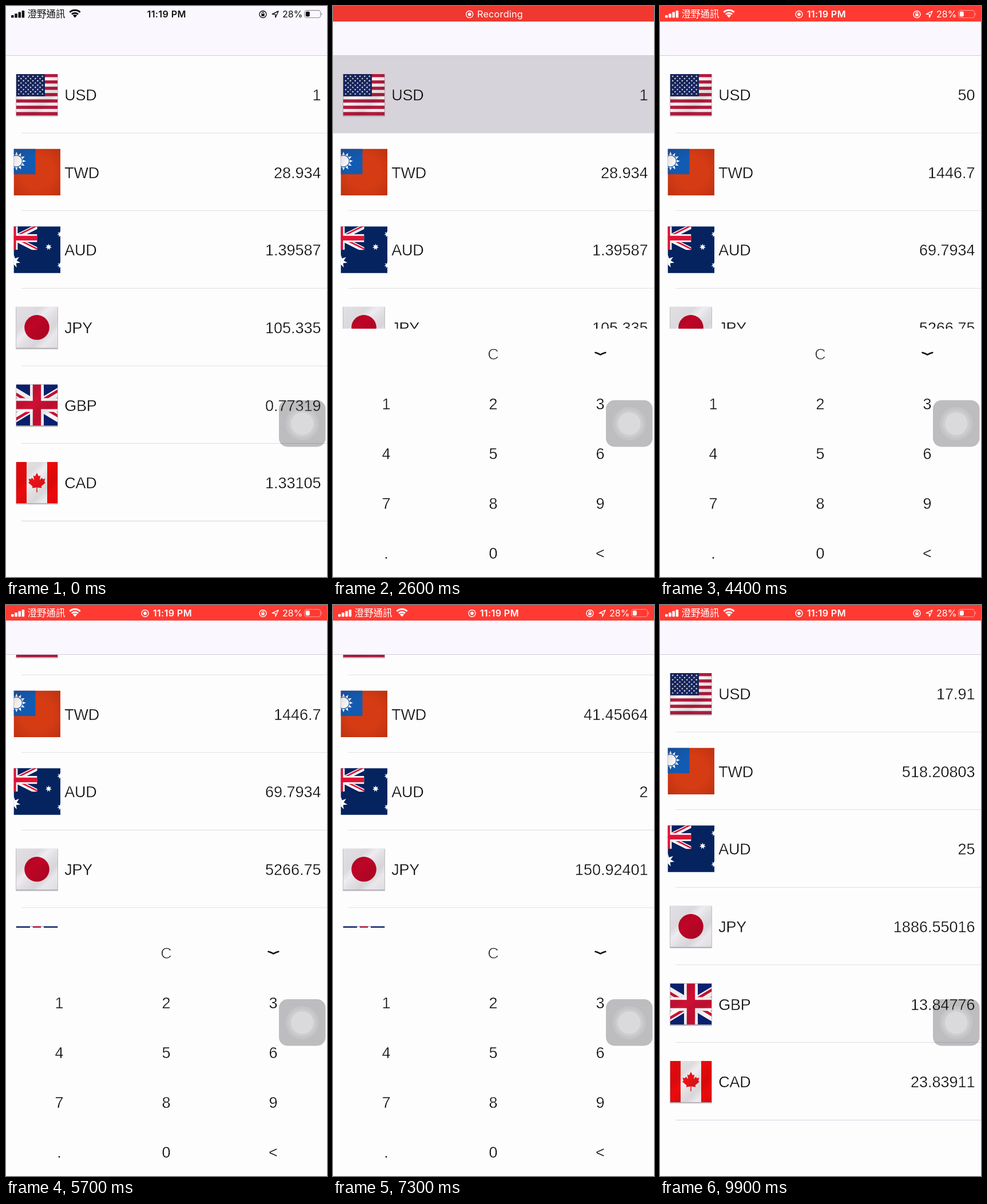
Recreate the animation shown at these times as an HTML page. Size 561 by 998 pixels, loop 10000 ms.

```html
<!DOCTYPE html>
<html lang="en">
<head>
<meta charset="utf-8">
<title>Currency converter</title>
<style>
  html, body { margin: 0; width: 100%; height: 100%; overflow: hidden; background: #fdfdfe; }
  svg { display: block; width: 561px; height: 998px; }
  text { font-family: "Liberation Sans", Arial, sans-serif; }
  .thin { --bg: #fdfdfe; font-size: 27px; font-kerning: none; fill: #080808; stroke: var(--bg); stroke-width: .45px; }
  .code { letter-spacing: -.3px; }
  .clear { fill: #222; stroke-width: .9px; }
  .bar text { font-family: Inter, "Noto Sans", sans-serif; fill: currentColor; }
  .bar .carrier { font-family: "Noto Sans CJK TC", "Noto Sans CJK", sans-serif; }
</style>
</head>
<body>
<svg id="stage" viewBox="0 0 561 998" xmlns="http://www.w3.org/2000/svg"></svg>
<script>
const LOOP = 10000, TOP = 87, PITCH = 135.6, PAPER = '#fdfdfe', PICKED = '#d6d3da';
const RATES = { USD: 1, TWD: 28.934, AUD: 1.395868, JPY: 105.335, GBP: .773186, CAD: 1.33105 };
const CODES = Object.keys(RATES);

// Each step holds until the next one.
const AMOUNTS = [[0, 'USD', 1], [3300, 'USD', 5], [3800, 'USD', 50], [7100, 'AUD', 2], [7500, 'AUD', 25]];
const PICKS = [[0, null], [2300, 'USD'], [3300, null], [6000, 'AUD'], [7100, null]];
const BARS = [[0, 'plain'], [900, 'notice'], [3500, 'live']];
const KEYPAD = [[0, false], [2300, true], [9100, false]];
const SCROLL = [[0, 0], [4900, 0], [5500, 100], [9100, 100], [9400, 0]];

const rect = (x, y, w, h, fill, more = '') =>
  `<rect x="${x}" y="${y}" width="${w}" height="${h}" fill="${fill}" ${more}/>`;
const circle = (x, y, r, fill, more = '') => `<circle cx="${x}" cy="${y}" r="${r}" fill="${fill}" ${more}/>`;
const path = (d, fill, more = '') => `<path d="${d}" fill="${fill}" ${more}/>`;
const repeat = (n, make) => Array.from({ length: n }, (_, i) => make(i)).join('');

function star(x, y, r, points, inner, fill = '#fff') {
  const at = i => {
    const a = Math.PI * i / points - Math.PI / 2, d = i % 2 ? r * inner : r;
    return (x + d * Math.cos(a)).toFixed(2) + ' ' + (y + d * Math.sin(a)).toFixed(2);
  };
  return path('M' + Array.from({ length: points * 2 }, (_, i) => at(i)).join('L') + 'Z', fill);
}

// Union flag of w by h, centred on the origin.
function union(w, h, blue, red) {
  const X = w / 2, Y = h / 2, k = h / 30 / Math.hypot(X, Y);
  const arms = [[1, -1], [1, 1], [-1, 1], [-1, -1]]
    .map(([a, b]) => `M${b * Y * k} ${-a * X * k}l${a * X} ${b * Y}`).join('');
  return rect(-X, -Y, w, h, blue) +
    path(`M${-X} ${-Y}L${X} ${Y}M${-X} ${Y}L${X} ${-Y}`, 'none', `stroke="#fff" stroke-width="${h / 5}"`) +
    path(arms, 'none', `stroke="${red}" stroke-width="${h / 15}"`) +
    rect(-X, -h / 6, w, h / 3, '#fff') + rect(-h / 6, -Y, h / 3, h, '#fff') +
    rect(-X, -h / 10, w, h / 5, red) + rect(-h / 10, -Y, h / 5, h, red);
}

function leaf() {
  const half = [[0, -17], [3.2, -11], [6.2, -12.6], [5, -4.5], [9, -8.8], [10, -6], [14.5, -6.8],
    [13, -1.5], [15, .2], [7.5, 6.5], [8.5, 9.5], [.7, 8.5], [.8, 17]];
  const back = half.slice(1).reverse().map(([x, y]) => [-x, y]);
  return path('M' + [...half, ...back].join('L') + 'Z', '#e8141a', 'transform="translate(36 36)"');
}

const FLAGS = {
  USD: () => repeat(13, i => rect(0, i * 72 / 13, 72, 72 / 13, i % 2 ? '#f6f2f4' : '#b8193d')) +
    rect(0, 0, 50, 38.8, '#172660') +
    repeat(9, r => repeat(6 - r % 2, c => star(4.2 + c * 8.3 + r % 2 * 4.15, 4 + r * 3.85, 1.9, 5, .42))),
  TWD: () => rect(0, 0, 82, 82, '#d63c14') + rect(0, 0, 38, 44.5, '#125bb0') +
    star(4.8, 21.5, 16.5, 12, .62) + circle(4.8, 21.5, 10.7, '#125bb0') + circle(4.8, 21.5, 9.5, '#fff') +
    rect(0, 0, 82, 82, 'url(#vignette)'),
  AUD: () => rect(0, 0, 82, 82, '#04235f') +
    `<g clip-path="url(#canton)"><g transform="translate(0 20.5)">${union(82, 41, '#04235f', '#e01234')}</g></g>` +
    star(0, 61, 12, 7, .45) + star(61, 36, 5.8, 7, .45) + star(81.5, 13.6, 5.8, 7, .45) + star(81.5, 68, 5.8, 7, .45),
  JPY: () => rect(0, 0, 72, 72, '#eeecf0') + circle(36, 36, 21.8, '#c00527'),
  GBP: () => `<g transform="translate(36 36)">${union(120, 72, '#0a2172', '#cf1034')}</g>`,
  CAD: () => rect(0, 0, 72, 72, '#f0eef0') + rect(0, 0, 18, 72, '#ee0a0c') + rect(54, 0, 18, 72, '#ee0a0c') + leaf()
};

function row(code, i) {
  const big = code === 'TWD' || code === 'AUD';
  const flag = big
    ? `<g transform="translate(13.5 27)"><g clip-path="url(#large)">${FLAGS[code]()}</g></g>`
    : `<g transform="translate(18 32)">${rect(-1, .5, 74, 74, '#77737c', 'rx="1" opacity=".28"')}` +
      rect(-.5, 0, 73, 73.2, '#77737c', 'opacity=".5"') +
      `<g clip-path="url(#small)">${FLAGS[code]()}${rect(0, 0, 72, 72, 'url(#gloss)')}</g></g>`;
  return `<g id="${code}" class="thin" transform="translate(0 ${TOP + i * PITCH})">` +
    rect(0, 0, 561, PITCH, PAPER, 'class="back" stroke="none"') + `<g stroke="none">${flag}</g>` +
    `<text class="code" x="102.3" y="78.3">${code}</text>` +
    `<text class="sum" x="550.5" y="78.3" text-anchor="end"></text>` +
    rect(27, PITCH - .9, 534, 1.2, '#d9d7e0', 'class="rule" stroke="none"') + '</g>';
}

function keypad() {
  const keys = [['', 'C', ''], ['1', '2', '3'], ['4', '5', '6'], ['7', '8', '9'], ['.', '0', '<']];
  const labels = keys.map((line, r) => line.map((k, c) =>
    `<text x="${93 + c * 187}" y="${618.3 + r * 86.8}" text-anchor="middle"${k === 'C' ? ' class="clear"' : ''}>${k}</text>`
  ).join('')).join('');
  return `<g id="keypad" class="thin">${rect(0, 564, 561, 434, PAPER, 'stroke="none"')}${labels}` +
    path('M458.5 605.8Q463 607 467.3 609.4Q471.8 607 476.3 605.8', 'none',
      'style="stroke:#111;stroke-width:2.7px" stroke-linecap="round"') + '</g>';
}

function arc(r) {
  const d = r * Math.SQRT1_2;
  return path(`M${120.5 - d} ${20 - d}A${r} ${r} 0 0 1 ${120.5 + d} ${20 - d}`, 'none',
    'stroke="currentColor" stroke-width="3"');
}

const target = x => circle(x, 14.5, 6, 'none', 'stroke="currentColor" stroke-width="1.4"') +
  circle(x, 14.5, 2.9, 'currentColor');

function statusBar() {
  const ink = 'currentColor';
  return `<g class="bar" id="bar">${rect(0, 0, 561, 27.2, 'none', 'id="tint"')}<g id="icons">` +
    repeat(4, i => rect(9 + i * 6.2, 16 - i * 2.7, 4.6, 4.6 + i * 2.7, ink, 'rx="1"')) +
    `<text class="carrier" x="37.5" y="20.3" font-size="16.5">澄野通訊</text>` +
    arc(12.8) + arc(7.8) + path('M120.5 20.5L116.8 16.5A5.4 5.4 0 0 1 124.2 16.5Z', ink) +
    `<g id="dot">${target(243)}</g>` +
    `<text id="clock" y="20.2" font-size="16.2" letter-spacing=".35" font-weight="600" text-anchor="middle">11:19 PM</text>` +
    circle(449, 14.5, 6, 'none', `stroke="${ink}" stroke-width="1.4"`) + rect(446.3, 13.8, 5.4, 4, ink) +
    path('M447.3 14V12.6a1.7 1.7 0 0 1 3.4 0V14', 'none', `stroke="${ink}" stroke-width="1.1"`) +
    path('M476 9L465.3 14.2L470.6 14.6L471 20Z', 'none', `stroke="${ink}" stroke-width="1.4" stroke-linejoin="round"`) +
    `<text x="483" y="20.2" font-size="16">28%</text>` +
    rect(521.7, 7.7, 28, 12.8, 'none', `rx="3.8" stroke="${ink}" stroke-opacity=".45" stroke-width="1.2"`) +
    rect(523.8, 9.8, 7, 8.6, ink, 'rx="1.8"') +
    path('M551.2 11.8q2.2 2.3 0 4.6Z', ink, 'opacity=".5"') +
    `</g><g id="notice">${target(238.7)}<text x="252" y="20.2" font-size="16.2" letter-spacing=".25">Recording</text></g></g>`;
}

const touch = rect(477, 689, 81.5, 81.5, '#28262a', 'rx="15" opacity=".3"') +
  [[29, .12], [24, .14], [19.8, .25]].map(([r, a]) => circle(517.7, 730, r, '#fff', `opacity="${a}"`)).join('');

const stop = (at, color, a) => `<stop offset="${at}" stop-color="${color}" stop-opacity="${a}"/>`;
const clip = (id, w, h) => `<clipPath id="${id}">${rect(0, 0, w, h, '#000')}</clipPath>`;
const $ = id => document.getElementById(id);

$('stage').innerHTML = `<defs>${clip('small', 72, 72)}${clip('large', 81.5, 81.5)}${clip('canton', 41, 41)}
  <linearGradient id="gloss" x1="0" y1="0" x2="1" y2="1">
    ${stop(0, '#000', .05)}${stop(.3, '#000', .08)}${stop(.42, '#000', 0)}
    ${stop(.55, '#000', .06)}${stop(.68, '#000', .1)}${stop(.8, '#000', .02)}${stop(1, '#000', .07)}
  </linearGradient>
  <radialGradient id="vignette" r=".75">${stop(.45, '#400', 0)}${stop(1, '#400', .2)}</radialGradient></defs>` +
  rect(0, 0, 561, 998, PAPER) + `<g id="list">${CODES.map(row).join('')}</g>` + keypad() +
  rect(0, 0, 561, 87, '#faf8fe') + rect(0, 86, 561, 1, '#cfcdd8') + statusBar() + touch;

const rows = CODES.map(code => {
  const el = $(code);
  return { code, el, back: el.querySelector('.back'), sum: el.querySelector('.sum'), rule: el.querySelector('.rule') };
});

const held = (steps, t) => steps.filter(s => s[0] <= t).pop();

function eased(steps, t) {
  const i = steps.findIndex(s => s[0] > t);
  if (i < 0) return steps[steps.length - 1][1];
  const [t0, a] = steps[i - 1], [t1, b] = steps[i];
  return a + (b - a) * (1 - (1 - (t - t0) / (t1 - t0)) ** 3);
}

const show = (id, on) => $(id).setAttribute('visibility', on ? 'visible' : 'hidden');

function render(t) {
  const [, base, amount] = held(AMOUNTS, t);
  const picked = held(PICKS, t)[1], mode = held(BARS, t)[1];
  const pick = CODES.indexOf(picked);
  rows.forEach(({ code, el, back, sum, rule }, i) => {
    const color = i === pick ? PICKED : PAPER;
    back.setAttribute('fill', color);
    el.style.setProperty('--bg', color);
    sum.textContent = +(amount / RATES[base] * RATES[code]).toFixed(5);
    rule.setAttribute('visibility', pick >= 0 && (i === pick || i === pick - 1) ? 'hidden' : 'visible');
  });
  $('list').setAttribute('transform', `translate(0 ${-eased(SCROLL, t)})`);
  show('keypad', held(KEYPAD, t)[1]);
  show('icons', mode !== 'notice');
  show('notice', mode === 'notice');
  show('dot', mode === 'live');
  $('clock').setAttribute('x', mode === 'live' ? 290.8 : 280.6);
  $('bar').style.color = mode === 'plain' ? '#111' : '#fff';
  $('tint').setAttribute('fill', { plain: 'none', notice: '#ef3830', live: '#ff3a32' }[mode]);
}

const start = performance.now();
function tick() {
  render((performance.now() - start) % LOOP);
  requestAnimationFrame(tick);
}
tick();
</script>
</body>
</html>
```
